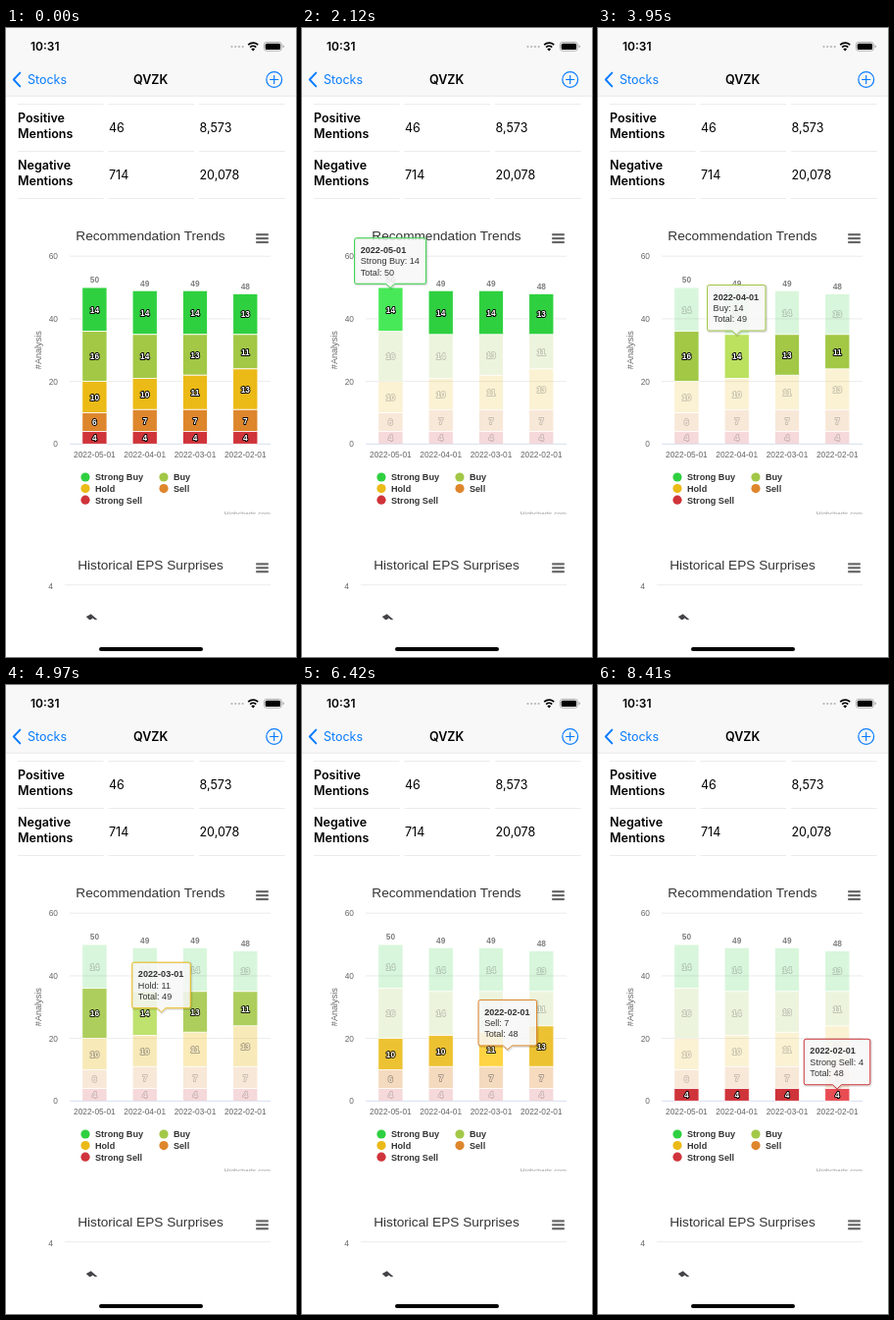
Write an HTML page that moves like this. It is 296x640 px and loops after 8450 ms.

```html
<!DOCTYPE html>
<html lang="en">
<head>
<meta charset="utf-8">
<title>Recommendation Trends</title>
<style>
html, body { margin: 0; width: 100%; height: 100%; overflow: hidden; background: #fff; }
svg { display: block; width: 100%; height: 100%; }
.ui { font-family: Inter, Roboto, sans-serif; font-size: 12.5px; }
.chart { font-family: "Liberation Sans", Arial, sans-serif; font-size: 8.35px; }
.semi { font-weight: 600; }
.bold { font-weight: 700; }
.mid { text-anchor: middle; }
.end { text-anchor: end; }
.label { font-weight: 700; fill: #fff; stroke: #000; stroke-width: 1.8; stroke-linejoin: round; paint-order: stroke; text-anchor: middle; }
</style>
</head>
<body>
<svg id="stage" viewBox="0 0 296 640"></svg>
<script>
const NS = 'http://www.w3.org/2000/svg';
const stage = document.getElementById('stage');

function el(tag, attrs = {}, parent = stage) {
  const node = document.createElementNS(NS, tag);
  for (const k in attrs) node.setAttribute(k, attrs[k]);
  return parent.appendChild(node);
}
function text(str, x, y, attrs = {}, parent = stage) {
  const node = el('text', { x, y, ...attrs }, parent);
  node.textContent = str;
  return node;
}
const line = (x1, x2, y, stroke, width = 1, parent = stage) =>
  el('path', { d: `M${x1} ${y}H${x2}`, stroke, 'stroke-width': width }, parent);

const LOOP = 8450;
const FADED = .18;
const dates = ['2022-05-01', '2022-04-01', '2022-03-01', '2022-02-01'];
const series = [
  { name: 'Strong Buy', rgb: [47, 208, 64], data: [14, 14, 14, 13] },
  { name: 'Buy', rgb: [162, 200, 70], data: [16, 14, 13, 11] },
  { name: 'Hold', rgb: [235, 186, 22], data: [10, 10, 11, 13] },
  { name: 'Sell', rgb: [222, 134, 44], data: [6, 7, 7, 7] },
  { name: 'Strong Sell', rgb: [207, 52, 58], data: [4, 4, 4, 4] }
];
const hovers = [
  { at: 1970, step: 150, s: 0, bar: 0 },
  { at: 3480, step: 117.5, s: 1, bar: 1 },
  { at: 4970, step: 110, s: 2, bar: 2 },
  { at: 6420, step: 110, s: 3, bar: 3 },
  { at: 7950, step: 115, s: 4, bar: 3 }
];

const css = (rgb, add = 0) => `rgb(${rgb.map(c => Math.min(255, Math.round(c + add)))})`;
const barX = i => 90.4 + 51.3 * i;
const valY = v => 423.3 - 3.185 * v;
const stackTop = (s, i) => series.slice(s).reduce((sum, r) => sum + r.data[i], 0);

function header() {
  const g = el('g', { class: 'ui' });
  el('rect', { width: 296, height: 69, fill: '#f8f8f8' }, g);
  line(0, 296, 69.2, '#dedede', .7, g);
  text('10:31', 25, 22.6, { class: 'semi', 'font-size': 12 }, g);
  for (let i = 0; i < 4; i++) el('circle', { cx: 230.5 + 3.7 * i, cy: 19, r: 1.1, fill: '#b4b4b4' }, g);
  el('path', { d: 'M247.2 17.2a7.1 7.1 0 0 1 10 0M249.2 19.6a4.3 4.3 0 0 1 6 0', fill: 'none', stroke: '#000', 'stroke-width': 1.7 }, g);
  el('path', { d: 'M252.2 23.6l-1.9-2.1a2.8 2.8 0 0 1 3.8 0z' }, g);
  el('rect', { x: 263.4, y: 14.4, width: 18, height: 8.8, rx: 2.6, fill: 'none', stroke: '#9b9b9b', 'stroke-width': .8 }, g);
  el('rect', { x: 264.7, y: 15.7, width: 15.4, height: 6.2, rx: 1.5 }, g);
  el('path', { d: 'M282.6 17.3v3q1.3-.3 1.3-1.5t-1.3-1.5', fill: '#9b9b9b' }, g);
  const blue = '#0a7bff';
  el('path', { d: 'M14.3 45.6L7.8 52.5L14.3 59.4', fill: 'none', stroke: blue, 'stroke-width': 1.9, 'stroke-linecap': 'round', 'stroke-linejoin': 'round' }, g);
  text('Stocks', 22, 57, { fill: blue }, g);
  text('QVZK', 147.7, 57, { class: 'semi mid' }, g);
  el('path', { d: 'M281.6 52.5a7.9 7.9 0 1 1-15.8 0a7.9 7.9 0 1 1 15.8 0M269.6 52.5h8.2M273.7 48.4v8.2', fill: 'none', stroke: blue, 'stroke-width': 1.2, 'stroke-linecap': 'round' }, g);
}

function table() {
  const g = el('g', { class: 'ui' });
  for (const y of [77.5, 125.5, 173.5])
    for (const x of [12, 104.5, 197]) line(x, x + 87.5, y, '#e6e6e6', .8, g);
  [['Positive', '46', '8,573'], ['Negative', '714', '20,078']].forEach(([kind, a, b], i) => {
    const y = 48 * i;
    text(kind, 12, 95.8 + y, { class: 'semi' }, g);
    text('Mentions', 12, 112.4 + y, { class: 'semi' }, g);
    text(a, 105, 105.8 + y, {}, g);
    text(b, 197.5, 105.8 + y, {}, g);
  });
}

function chartTitle(str, y, g) {
  text(str, 147.5, y, { class: 'mid', 'font-size': 13.65, fill: '#333' }, g);
  for (let i = 0; i < 3; i++) line(255.2, 267.8, y - 5.8 + 3.9 * i, '#666', 2.2, g);
}

const chart = el('g', { class: 'chart' });
chartTitle('Recommendation Trends', 216, chart);
for (const v of [0, 20, 40, 60]) {
  line(65, 270, valY(v), v ? '#e6e6e6' : '#ccd6eb', .8, chart);
  text(v, 53, valY(v) + 3, { class: 'end', fill: '#666' }, chart);
}
text('#Analysis', 0, 0, { class: 'mid', 'font-size': 9.1, fill: '#666', transform: 'translate(36 327.7) rotate(-90)' }, chart);

for (const [s, row] of series.entries()) {
  // Bars and labels fade separately, so faded labels stay see-through
  const bars = el('g', {}, chart), labels = el('g', {}, chart);
  row.groups = [bars, labels];
  row.bars = row.data.map((v, i) => el('rect', {
    x: barX(i) - 12.6, y: valY(stackTop(s, i)), width: 25.2, height: v * 3.185, stroke: '#fff', 'stroke-width': .8
  }, bars));
  row.data.forEach((v, i) =>
    text(v, barX(i), valY(stackTop(s, i) - v / 2) + 3.2, { class: 'label' }, labels));
  const lx = s % 2 ? 161 : 81, ly = 457 + 11.6 * (s >> 1);
  el('circle', { cx: lx, cy: ly, r: 4.6, fill: css(row.rgb) }, chart);
  text(row.name, lx + 10, ly + 3.4, { class: 'bold', 'font-size': 9.1, fill: '#333' }, chart);
}
dates.forEach((d, i) => {
  text(stackTop(0, i), barX(i), valY(stackTop(0, i)) - 4.7, { class: 'bold mid', fill: '#808080' }, chart);
  text(d, barX(i), 437, { class: 'mid', fill: '#666' }, chart);
});

const clip = el('clipPath', { id: 'cut' });
el('rect', { y: 480, width: 296, height: 14.8 }, clip);
const credit = el('g', { 'clip-path': 'url(#cut)' }, chart);
text('Highcharts.com', 270, 496.6, { class: 'end', 'font-size': 6.8, fill: '#999' }, credit);

chartTitle('Historical EPS Surprises', 551.2, chart);
text('4', 48, 571, { class: 'end', fill: '#666' }, chart);
line(60, 270, 566.7, '#e6e6e6', .8, chart);
el('path', { d: 'M81.8 599L86.8 596.2L93.3 602H90.6L88.4 600.5L86.6 602H85z', fill: '#434348' }, chart);

header();
table();
el('rect', { x: 95, y: 630, width: 106, height: 4, rx: 2 });

// Tooltip: box with a small pointer, three lines of text
const tip = el('g', { class: 'chart' });
const shadow = el('path', { fill: 'none', stroke: '#000', 'stroke-opacity': .12, 'stroke-width': 2.4, transform: 'translate(.8 .8)' }, tip);
const box = el('path', { fill: '#f7f7f7', 'fill-opacity': .85, 'stroke-width': 1 }, tip);
const rows = [15.2, 26.7, 37.9].map((y, i) =>
  text('', 6.1, y, { class: i ? '' : 'bold', 'font-size': 9.1, fill: '#333' }, tip));

const tipWidth = h => [73, 59.5, 59.5, 59.5, 67.5][h.s];
const tipPos = h => [barX(h.bar) - tipWidth(h) / 2 - .3, valY(stackTop(h.s, h.bar)) - 50.3];

function drawTip(h, prev, k) {
  const row = series[h.s], w = tipWidth(h), m = w / 2;
  let [x, y] = tipPos(h);
  if (prev) {
    const [px, py] = tipPos(prev), n = 1 + 3.5 * k;
    x += (px - x) * Math.pow(2 / 3, n);
    y += (py - y) * Math.pow(1 / 2, n);
  }
  tip.setAttribute('transform', `translate(${x} ${y})`);
  const d = `M2 0H${w - 2}q2 0 2 2V44.5q0 2-2 2H${m + 4.5}L${m} 50.6L${m - 4.5} 46.5H2q-2 0-2-2V2q0-2 2-2z`;
  shadow.setAttribute('d', d);
  box.setAttribute('d', d);
  box.setAttribute('stroke', css(row.rgb));
  rows[0].textContent = dates[h.bar];
  rows[1].textContent = `${row.name}: ${row.data[h.bar]}`;
  rows[2].textContent = `Total: ${stackTop(0, h.bar)}`;
}

function draw(t) {
  const n = hovers.filter(h => h.at <= t).length - 1;
  const h = hovers[n], prev = hovers[n - 1];
  const k = h ? Math.min(4, Math.floor((t - h.at) / h.step + 1e-6)) : 0;
  const p = k > 0 ? 1 : prev ? .15 : .32;
  const alpha = (hover, s) => !hover || hover.s === s ? 1 : FADED;
  const glow = (hover, s, i) => hover && hover.s === s && hover.bar === i ? 25 : 0;
  const mix = (a, b) => a + (b - a) * p;
  series.forEach((row, s) => {
    const opacity = mix(alpha(prev, s), alpha(h, s));
    row.groups.forEach(g => g.setAttribute('opacity', opacity));
    row.bars.forEach((bar, i) =>
      bar.setAttribute('fill', css(row.rgb, mix(glow(prev, s, i), glow(h, s, i)))));
  });
  tip.setAttribute('visibility', h ? 'visible' : 'hidden');
  if (h) drawTip(h, prev, k);
}

const start = performance.now();
function tick() {
  draw((performance.now() - start) % LOOP);
  requestAnimationFrame(tick);
}
tick();
</script>
</body>
</html>
```
